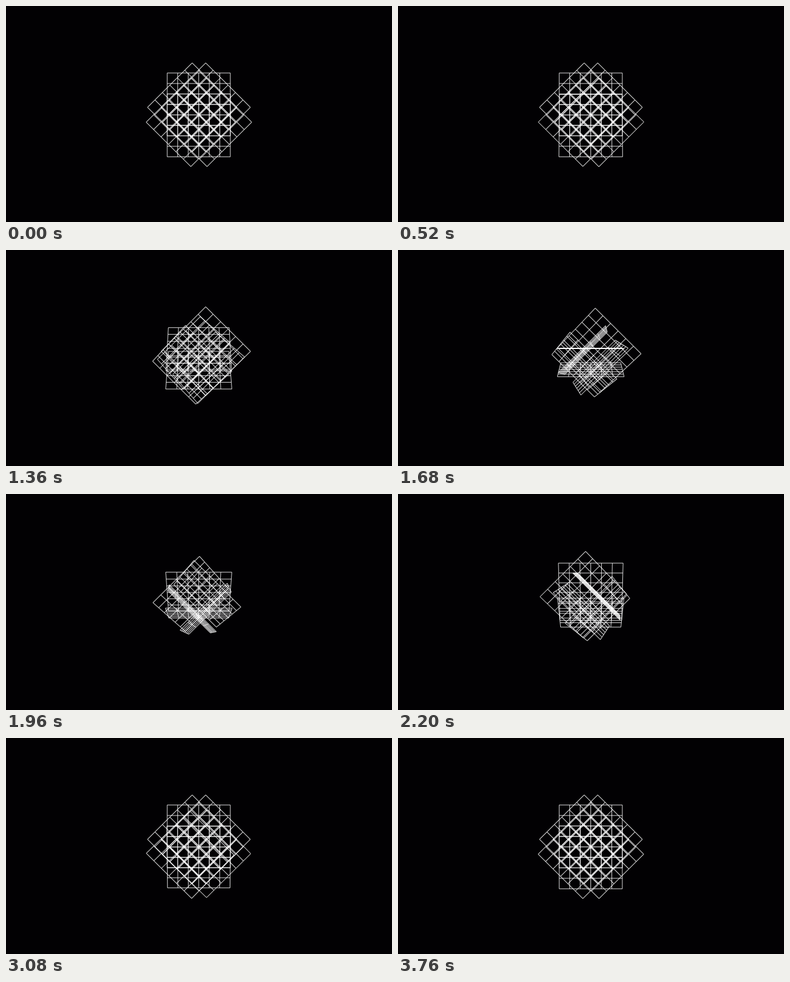
Recreate the animation shown at these times as an HTML page with a canvas. Size 640x360 px, loop 3.84 s.

```html
<!DOCTYPE html>
<html lang="en">
<head>
<meta charset="utf-8">
<title>Flipping grids</title>
<style>
  html, body { margin: 0; width: 100%; height: 100%; overflow: hidden; background: #020103; }
  canvas { display: block; }
</style>
</head>
<body>
<canvas id="stage" width="640" height="360"></canvas>
<script>
const ctx = document.getElementById('stage').getContext('2d');

const LOOP = 3840, STEP = 40;
const CELL = 17.45, HALF = 3, DEPTH = 950;

// Each axis holds two overlapping grids, one cell either side of its middle.
// Every grid flips half a turn about its own centre line.
// tilt -1 sends the upper edge away first, 1 brings it nearer first.
const axes = [
  { x: 319.6, y: 181.5, turn: 0, tilt: -1,
    grids: [{ shift: -1, start: 690, end: 2690 }, { shift: 1, start: 20, end: 3640 }] },
  { x: 321, y: 181.2, turn: -Math.PI / 4, tilt: -1,
    grids: [{ shift: -1, start: 650, end: 2650 }, { shift: 1, start: 20, end: 3660 }] },
  { x: 318.8, y: 181.2, turn: Math.PI / 4, tilt: 1,
    grids: [{ shift: -1, start: 1160, end: 3180 }, { shift: 1, start: 300, end: 3760 }] }
];

const clamp = v => Math.min(1, Math.max(0, v));
const ease = v => (1 - Math.cos(Math.PI * clamp(v))) / 2;

function drawGrid({ shift, start, end }, tilt, time) {
  const angle = Math.PI * ease((time - start) / (end - start));
  const project = (u, v) => {
    const y = shift + v * Math.cos(angle);
    const z = -tilt * v * Math.sin(angle) * CELL;
    const scale = CELL * DEPTH / (DEPTH - z);
    return [u * scale, y * scale];
  };
  const line = (u1, v1, u2, v2) => {
    ctx.moveTo(...project(u1, v1));
    ctx.lineTo(...project(u2, v2));
  };
  ctx.beginPath();
  for (let i = -HALF; i <= HALF; i++) {
    line(i, -HALF, i, HALF);
    line(-HALF, i, HALF, i);
  }
  ctx.stroke();
}

function draw(time) {
  ctx.fillStyle = '#020103';
  ctx.fillRect(0, 0, 640, 360);
  ctx.strokeStyle = 'rgba(255, 255, 255, 0.85)';
  ctx.lineWidth = 1;
  for (const { x, y, turn, tilt, grids } of axes) {
    ctx.save();
    ctx.translate(x, y);
    ctx.rotate(turn);
    for (const grid of grids) drawGrid(grid, tilt, time);
    ctx.restore();
  }
}

const origin = performance.now();
function tick() {
  const elapsed = (performance.now() - origin) % LOOP;
  draw(Math.floor(elapsed / STEP) * STEP);
  requestAnimationFrame(tick);
}
tick();
</script>
</body>
</html>
```
